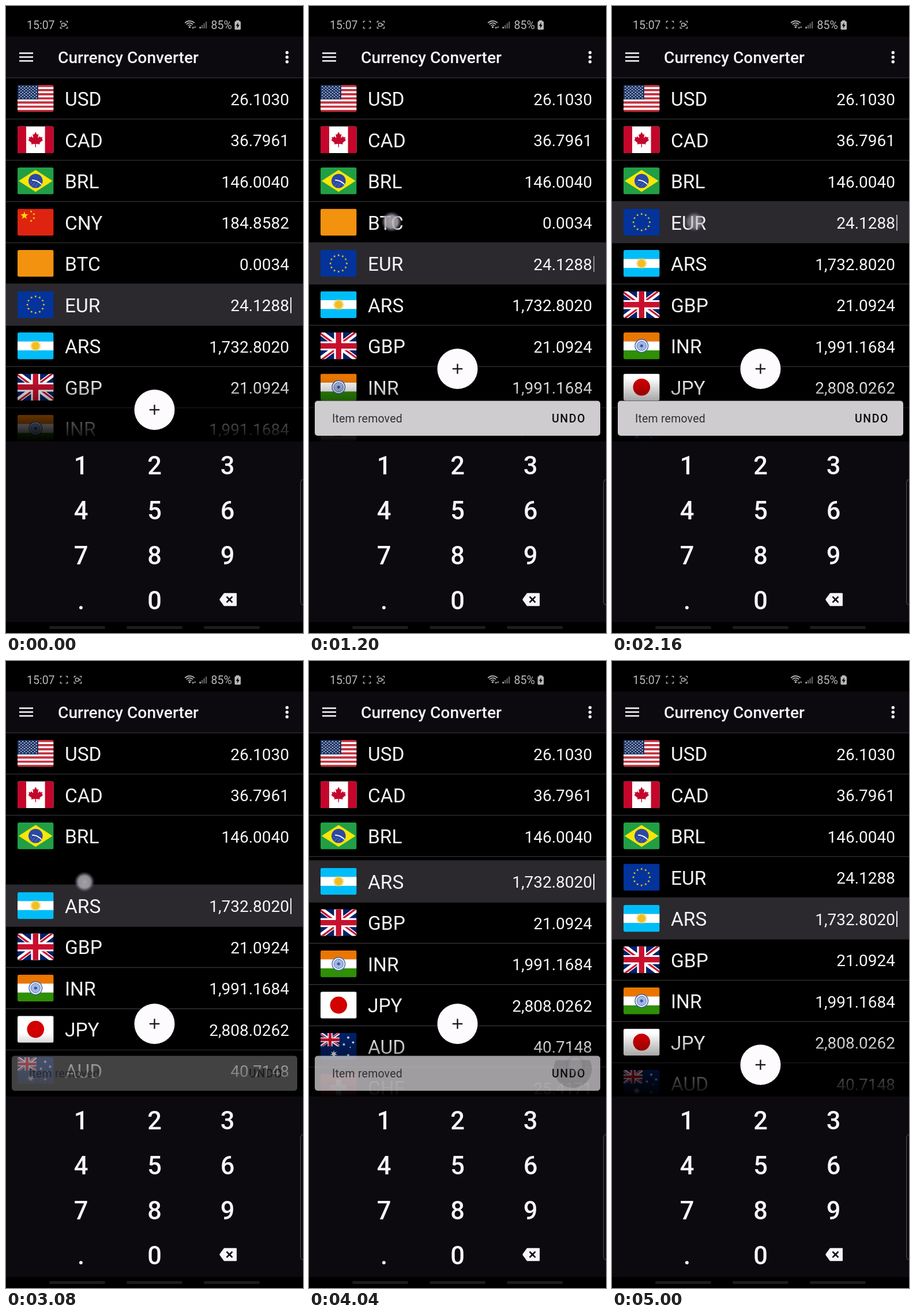
Recreate the animation shown at these times as an HTML page with a canvas. Size 515 by 1087 pixels, loop 5.04 s.

```html
<!DOCTYPE html>
<html lang="en">
<head>
<meta charset="utf-8">
<title>Currency Converter</title>
<style>
html, body { margin: 0; width: 100%; height: 100%; overflow: hidden; background: #000; }
canvas { display: block; width: 100vw; height: 100vh; }
</style>
</head>
<body>
<canvas id="stage" width="515" height="1087"></canvas>
<script>
const ctx = document.getElementById('stage').getContext('2d');
const W = 515, LOOP = 5040, STEP = 40, TOP = 124.5, ROW = 71.5, FW = 62.6, FH = 46.5;
const PANEL = '#0c0a0e', TAU = Math.PI * 2;

const clamp = v => Math.max(0, Math.min(1, v));
const prog = (t, start, len) => clamp((t - start) / len);
const smooth = p => 0.5 - 0.5 * Math.cos(Math.PI * p);
const decel = p => 1 - (1 - p) ** 2;
const mix = (a, b, p) => a + (b - a) * p;

function rect(color, x, y, w, h, r = 0) {
  ctx.fillStyle = color;
  ctx.beginPath();
  ctx.roundRect(x, y, w, h, r);
  ctx.fill();
}
function disc(color, x, y, r) {
  ctx.fillStyle = color;
  ctx.beginPath();
  ctx.arc(x, y, r, 0, TAU);
  ctx.fill();
}
function poly(color, pts) {
  ctx.fillStyle = color;
  ctx.beginPath();
  pts.forEach(([x, y]) => ctx.lineTo(x, y));
  ctx.fill();
}
function line(color, width, ...pts) {
  ctx.strokeStyle = color;
  ctx.lineWidth = width;
  ctx.beginPath();
  pts.forEach(([x, y], i) => i ? ctx.lineTo(x, y) : ctx.moveTo(x, y));
  ctx.stroke();
}
function ring(color, width, x, y, r, a = 0, b = TAU) {
  ctx.strokeStyle = color;
  ctx.lineWidth = width;
  ctx.beginPath();
  ctx.arc(x, y, r, a, b);
  ctx.stroke();
}
function star(color, x, y, r, n = 5, inner = 0.4) {
  poly(color, Array.from({ length: n * 2 }, (_, i) => {
    const a = i * Math.PI / n - Math.PI / 2, q = i % 2 ? r * inner : r;
    return [x + q * Math.cos(a), y + q * Math.sin(a)];
  }));
}
function text(str, x, y, size, { color = '#f7f5f9', weight = 400, align = 'left', gap = 0 } = {}) {
  ctx.font = `${weight} ${size}px Roboto, sans-serif`;
  ctx.letterSpacing = gap + 'px';
  ctx.textAlign = align;
  ctx.fillStyle = color;
  ctx.fillText(str, x, y);
}
function bands(colors) {
  const h = FH / colors.length;
  colors.forEach((c, i) => rect(c, 0, i * h, FW, h + 0.3));
}

// Union flag on a 640 by 480 grid
function jack(w, h) {
  const red = '#c8102e';
  ctx.save();
  ctx.beginPath();
  ctx.rect(0, 0, w, h);
  ctx.clip();
  ctx.scale(w / 640, h / 480);
  rect('#012169', 0, 0, 640, 480);
  line('#fff', 94, [0, 0], [640, 480]);
  line('#fff', 94, [640, 0], [0, 480]);
  poly(red, [[424, 281], [640, 440], [640, 480], [369, 281]]);
  poly(red, [[240, 301], [246, 336], [54, 480], [0, 480]]);
  poly(red, [[640, 0], [640, 3], [391, 191], [393, 147], [590, 0]]);
  poly(red, [[0, 0], [239, 176], [179, 176], [0, 42]]);
  for (const [c, s] of [['#fff', 160], [red, 96]]) {
    rect(c, 0, 240 - s / 2, 640, s);
    rect(c, 320 - s / 2, 0, s, 480);
  }
  ctx.restore();
}

const CX = FW / 2, CY = FH / 2;
const LEAF = [[0, -13.5], [2.6, -8.8], [5, -9.8], [4, -2.8], [7.5, -6], [8.5, -4], [12, -4.6],
  [11, -1], [13, 0.5], [7, 5.5], [7.6, 8], [0.7, 7.2], [0.7, 13]];

const flags = {
  USD() {
    for (let i = 0; i < 13; i++) rect(i % 2 ? '#fff' : '#c9303e', 0, i * FH / 13, FW, FH / 13 + 0.2);
    rect('#1d3566', 0, 0, 36, FH * 7 / 13);
    for (let r = 0; r < 9; r++)
      for (let c = 0; c < 6 - r % 2; c++)
        star('#fff', 3.2 + c * 5.9 + (r % 2) * 2.95, 2.8 + r * 2.45, 1.5);
  },
  CAD() {
    rect('#fff', 0, 0, FW, FH);
    rect('#c4062b', 0, 0, 15, FH);
    rect('#c4062b', FW - 15, 0, 15, FH);
    const left = LEAF.map(([x, y]) => [-x, y]).reverse();
    poly('#c4062b', [...LEAF, ...left].map(([x, y]) => [x + CX, y + CY]));
  },
  BRL() {
    rect('#229e45', 0, 0, FW, FH);
    poly('#f8e509', [[1.9, CY], [CX, 4.3], [FW - 1.9, CY], [CX, FH - 4.3]]);
    disc('#2b49a3', CX, CY, 12.3);
    ring('#fff', 1.8, CX - 7, CY + 22, 23.5, -1.53, -0.74);
    for (let i = 0; i < 9; i++) disc('#dfe4f2', CX - 8 + i * 1.9, CY + 3 + (i * 5 % 7), 0.5);
  },
  CNY() {
    rect('#de2410', 0, 0, FW, FH);
    star('#ffde00', 11.8, 11.8, 7.1);
    [[23.6, 4.7], [28.3, 9.4], [28.3, 16.4], [23.6, 21.1]].forEach(([x, y]) => star('#ffde00', x, y, 2.4));
  },
  BTC() { rect('#f2920f', 0, 0, FW, FH); },
  EUR() {
    rect('#03339b', 0, 0, FW, FH);
    for (let i = 0; i < 12; i++)
      star('#fc0', CX + 14.2 * Math.sin(i * TAU / 12), CY - 14.2 * Math.cos(i * TAU / 12), 2.35);
  },
  ARS() {
    bands(['#00bdfa', '#fff', '#00bdfa']);
    star('#f5c83c', CX, CY, 10.5, 16, 0.62);
    disc('#f3bd24', CX, CY, 6);
  },
  GBP() { jack(FW, FH); },
  INR() {
    bands(['#ea7600', '#fff', '#2f8f07']);
    disc('#e6ebf7', CX, CY, 11.3);
    ring('#2a55a8', 1.2, CX, CY, 11.3);
    disc('#b9c7e8', CX, CY, 8);
    ring('#2a55a8', 0.8, CX, CY, 8);
    for (let i = 0; i < 12; i++) {
      const a = i * TAU / 12, c = Math.cos(a) * 8, s = Math.sin(a) * 8;
      line('#5b7cc0', 0.6, [CX, CY], [CX + c, CY + s]);
    }
    disc('#2a55a8', CX, CY, 2.4);
  },
  JPY() {
    rect('#fff', 0, 0, FW, FH);
    disc('#d30000', CX, CY, 14.8);
  },
  AUD() {
    rect('#012169', 0, 0, FW, FH);
    jack(33, 23.5);
    star('#fff', 23, 36.5, 6.5, 7);
    [[48, 8], [40.5, 20], [56.5, 16.5], [48, 38.5]].forEach(([x, y]) => star('#fff', x, y, 3, 7));
    star('#fff', 51.5, 25, 1.7);
  },
  CHF() {
    rect('#d8232a', 0, 0, FW, FH);
    rect('#fff', CX - 4.5, CY - 14, 9, 28);
    rect('#fff', CX - 14, CY - 4.5, 28, 9);
  }
};

const rates = {
  USD: '26.1030', CAD: '36.7961', BRL: '146.0040', CNY: '184.8582', BTC: '0.0034', EUR: '24.1288',
  ARS: '1,732.8020', GBP: '21.0924', INR: '1,991.1684', JPY: '2,808.0262', AUD: '40.7148', CHF: '25.4171'
};
const codes = Object.keys(rates);

// "move" is when the rows below start closing the gap
const swipes = [
  { code: 'CNY', move: 953, x: 146, y: 381, restX: 143, restY: 374, fade: [1740, 50] },
  { code: 'BTC', move: 2020, x: 143, y: 376, restX: 143, restY: 374, fade: [2120, 110] },
  { code: 'EUR', move: 3033, x: 136, y: 383, restX: 136, restY: 383, fade: [3110, 110] }
];
const UNDO = 4014, MOVE = 125;
const snackEvents = [[975, 1], [2015, 0], [2083, 1], [3029, 0], [3105, 1], [4023, 0]];

function fingerX(s, t) {
  return mix(400, s.x, smooth(prog(t, s.move - 190, 60)));
}
function rowState(i, t) {
  let pos = i, dx = 0, alpha = 1, shown = true;
  for (const s of swipes) {
    const k = codes.indexOf(s.code);
    const back = s.code === 'EUR' ? smooth(prog(t, UNDO, MOVE)) : 0;
    if (i > k) pos -= smooth(prog(t, s.move, MOVE)) - back;
    if (i !== k) continue;
    if (s.code === 'EUR' && t >= UNDO) {
      alpha = prog(t, UNDO + MOVE, 60);
    } else {
      dx = fingerX(s, t) - 400;
      dx = mix(dx, -W, decel(prog(t, s.move - 130, 70)));
      shown = t < s.move - 60;
    }
  }
  return { y: TOP + pos * ROW, dx, alpha, shown };
}

function drawRow(code, i, t) {
  const { y, dx, alpha, shown } = rowState(i, t);
  if (!shown || y > 756) return;
  const active = code === (t < 2973 ? 'EUR' : 'ARS');
  rect('#2b2a2d', 0, y - 0.8, W, 1.6);
  ctx.save();
  ctx.globalAlpha = alpha;
  ctx.translate(dx, y);
  if (active) rect('#2b292d', 0, 0, W, ROW);
  text(code, 102, 48.6, 33.5);
  text(rates[code], 491, 47, 28, { align: 'right' });
  if (active) {
    const blink = 0.65 + 0.35 * Math.cos((t - 40) / 500 * TAU);
    rect(`rgba(247,245,249,${blink})`, 493, 23, 2, 27.5);
  }
  ctx.translate(20, 12.5);
  ctx.beginPath();
  ctx.roundRect(0, 0, FW, FH, 3);
  ctx.clip();
  flags[code]();
  ctx.restore();
}

function drawList(t) {
  ctx.save();
  ctx.beginPath();
  ctx.rect(0, 123, W, 632);
  ctx.clip();
  codes.forEach((c, i) => drawRow(c, i, t));
  const g = ctx.createLinearGradient(0, 645, 0, 757);
  g.addColorStop(0, 'rgba(0,0,0,0)');
  g.addColorStop(1, 'rgba(0,0,0,1)');
  rect(g, 0, 645, W, 110);
  ctx.restore();
}

function captureIcon(x, y, lens) {
  const c = '#b5b5b5';
  for (const sx of [-1, 1])
    for (const sy of [-1, 1])
      line(c, 1.3, [x + sx * 3.2, y + sy * 6], [x + sx * 6.2, y + sy * 6], [x + sx * 6.2, y + sy * 3.2]);
  if (!lens) return;
  ctx.strokeStyle = c;
  ctx.lineWidth = 1.4;
  ctx.beginPath();
  ctx.roundRect(x - 4, y - 2.7, 5.6, 5.4, 1);
  ctx.stroke();
  poly(c, [[x + 2, y], [x + 4.6, y - 2.5], [x + 4.6, y + 2.5]]);
}

function drawStatus(t) {
  const c = '#b9b9b9';
  text('15:07', 36, 39.7, 19.5, { color: c });
  if (t < 250) {
    captureIcon(100.5, 32.5, true);
  } else {
    captureIcon(100.5, 32.5, t % 500 >= 250);
    captureIcon(124.5, 32.5, true);
  }
  for (const r of [4, 7.6, 11.2]) ring(c, 1.7, 318.5, 37, r, -2.4, -0.74);
  disc(c, 318.5, 36.6, 1.7);
  poly(c, [[322.5, 36.5], [326, 36.5], [324.2, 40]]);
  poly('#8a8a8a', [[326, 38], [329.5, 38], [327.8, 34]]);
  for (let i = 0; i < 4; i++) rect(i < 1 ? c : '#5b5b5b', 335.5 + i * 3.5, 36 - i * 3, 2.4, 3 + i * 3);
  text('85%', 355.5, 39.7, 19.5, { color: c });
  rect(c, 399, 24.8, 5.5, 3);
  rect(c, 396.5, 26.5, 10.5, 14.5, 1.5);
  poly('#000', [[402.8, 28.5], [398.6, 34.5], [401.3, 34.5], [400.6, 39], [404.9, 32.8], [402.2, 32.8]]);
}

function drawHeader() {
  rect(PANEL, 0, 53, W, 71);
  for (const y of [81.8, 88.5, 95.2]) rect('#f7f5f9', 23, y - 1.3, 24, 2.6);
  for (const y of [80.7, 88.7, 96.7]) disc('#f7f5f9', 487.3, y, 2.7);
  text('Currency Converter', 90, 99, 28.2, { weight: 500 });
}

function drawKeys() {
  rect(PANEL, 0, 755, W, 313);
  ['123', '456', '789', '.0'].forEach((keys, r) => [...keys].forEach((k, c) =>
    text(k, [130, 257.5, 384][c], 811.7 + r * 78, 43.5, { weight: 500, align: 'center' })));
  ctx.lineJoin = 'round';
  const shape = [[371, 1029], [378.5, 1018.8], [399, 1018.8], [399, 1039.2], [378.5, 1039.2], [371, 1029]];
  poly('#f7f5f9', shape);
  line('#f7f5f9', 2, ...shape);
  ctx.lineJoin = 'miter';
  line(PANEL, 2.5, [382.5, 1024], [392.5, 1034]);
  line(PANEL, 2.5, [392.5, 1024], [382.5, 1034]);
  for (const x of [75, 209, 343]) rect('#1d1d1f', x, 1075, 97, 5, 2.5);
  ctx.strokeStyle = '#4a494d';
  ctx.lineWidth = 1.2;
  ctx.beginPath();
  ctx.roundRect(510.6, 820.6, 20, 218, 6);
  ctx.stroke();
}

function drawFab(t) {
  const up = decel(prog(t, 950, 62)) - smooth(prog(t, 4098, 100));
  const x = 257.5, y = 700 - 71 * up;
  disc('#fefbff', x, y, 35);
  rect('#1a191c', x - 8.7, y - 1.2, 17.4, 2.4);
  rect('#1a191c', x - 1.2, y - 8.7, 2.4, 17.4);
}

function drawSnack(t) {
  const ev = snackEvents.filter(e => e[0] <= t).pop();
  if (!ev) return;
  const p = prog(t, ev[0], 75), alpha = ev[1] ? p : 1 - p;
  if (!alpha) return;
  const s = ev[1] ? mix(0.8, 1, decel(p)) : 1;
  ctx.save();
  ctx.globalAlpha = alpha;
  ctx.translate(257.5, 715);
  ctx.scale(s, s);
  ctx.translate(-257.5, -715);
  rect('#cfccd0', 10, 684.5, 495, 60.5, 5);
  const press = prog(t, 3930, 90);
  if (press && t < 4110) {
    ctx.save();
    ctx.beginPath();
    ctx.rect(415, 692, 80, 48);
    ctx.clip();
    disc('rgba(20,20,24,0.22)', 457.5, 707, 33 * press);
    ctx.restore();
  }
  // the label stays legible while the bar is still faint
  ctx.globalAlpha = 1 - (1 - alpha) ** 3;
  text('Item removed', 40, 722.3, 19.5, { color: mix(0, 1, alpha) < 0.6 ? '#19181b' : '#302f33', gap: 0.2 });
  text('UNDO', 421, 722.3, 19.5, { color: '#0d0c10', weight: 500, gap: 1.6 });
  ctx.restore();
}

function touch(x, y, alpha) {
  if (alpha <= 0) return;
  ctx.save();
  ctx.globalAlpha = alpha;
  const g = ctx.createRadialGradient(x, y, 0, x, y, 18);
  g.addColorStop(0, 'rgba(188,184,188,0.88)');
  g.addColorStop(0.6, 'rgba(170,166,172,0.85)');
  g.addColorStop(0.74, 'rgba(120,118,132,0.7)');
  g.addColorStop(1, 'rgba(70,70,100,0)');
  disc(g, x, y, 18);
  ctx.restore();
}

function drawTouches(t) {
  for (const s of swipes) {
    const alpha = prog(t, s.move - 250, 50) * (1 - prog(t, ...s.fade));
    const slide = prog(t, s.move - 190, 60), rest = smooth(prog(t, s.move + 80, 60));
    touch(mix(fingerX(s, t), s.restX, rest), mix(mix(374, s.y, slide), s.restY, rest), alpha);
  }
  touch(462, 700, 0.9 * prog(t, 3880, 40) * (1 - prog(t, 3985, 80)));
}

// The picture advances in fixed steps, like the screen recording it imitates
function draw(now) {
  const t = Math.floor((now % LOOP) / STEP + 0.02) * STEP % LOOP;
  rect('#000', 0, 0, W, 1087);
  drawList(t);
  drawStatus(t);
  drawHeader();
  rect('#2b2a2d', 0, 123.7, W, 1.4);
  drawKeys();
  drawFab(t);
  drawSnack(t);
  drawTouches(t);
}

const start = performance.now();
function tick() {
  draw(performance.now() - start);
  requestAnimationFrame(tick);
}
tick();
</script>
</body>
</html>
```
